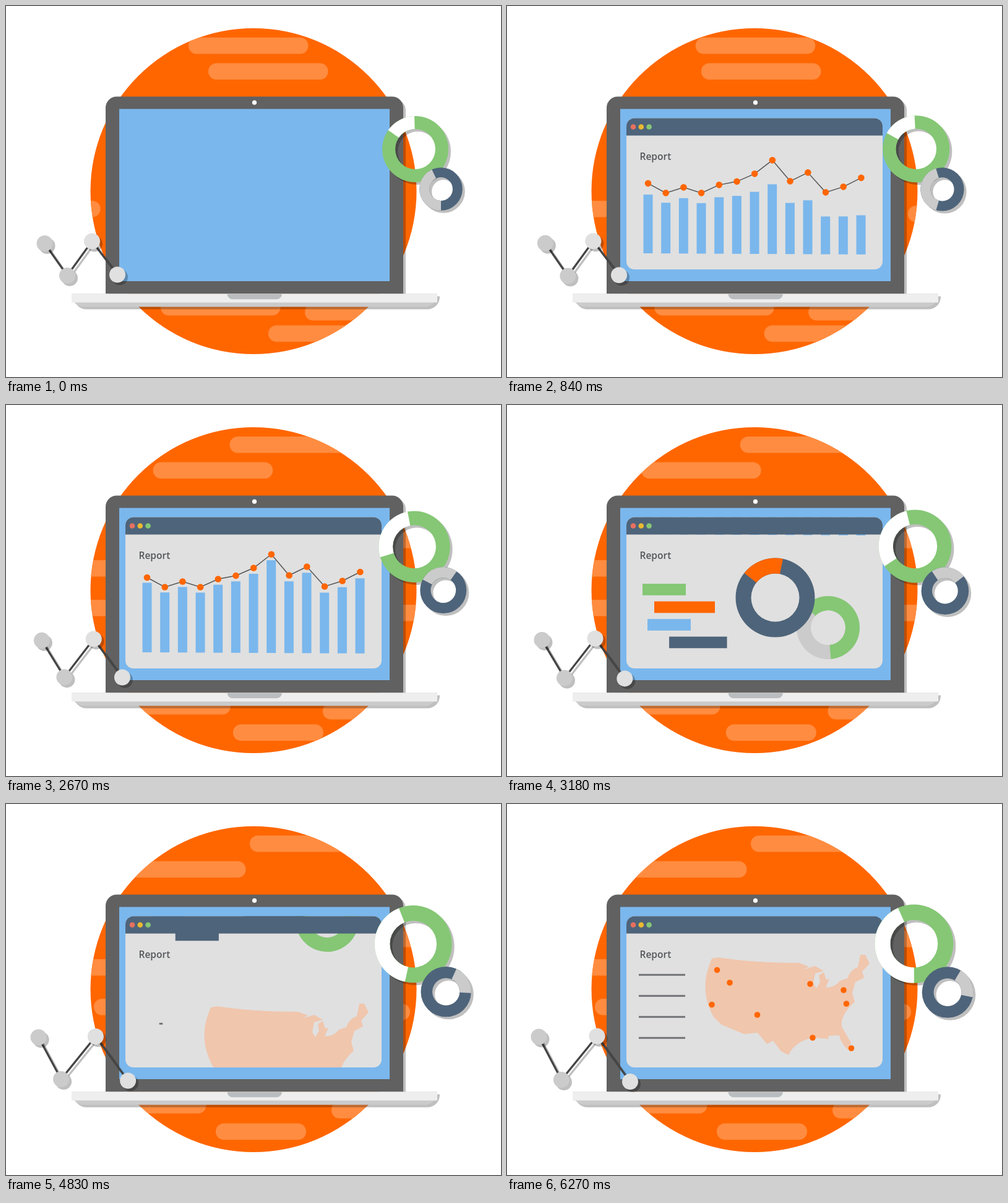
Animation, 800 px wide and 600 px high, one loop 6.3 s. Source, as an HTML page with a canvas:

```html
<!DOCTYPE html>
<html lang="en">
<head>
<meta charset="utf-8">
<title>Report</title>
<style>
html, body { margin: 0; width: 100%; height: 100%; overflow: hidden; background: #fff; }
canvas { display: block; }
</style>
</head>
<body>
<canvas id="stage" width="800" height="600"></canvas>
<script>
const c = document.getElementById('stage').getContext('2d');
const LOOP = 6300, STEP = 30, TAU = 2 * Math.PI;
const ORANGE = '#ff6600', BLUE = '#7ab7ed', NAVY = '#4e647a', GREEN = '#85c775',
      PALE = '#e0e0e0', GREY = '#cbcbcb';

// Background stripes: start x, y, travel, width
const stripes = [
  [295, 51, 99], [327, 92.5, -133], [250, 474, -120], [483, 482, 43], [424, 516.5, -85, 146],
  [-41, 315, 183], [181, 251, -134], [432, 205, 130], [668.5, 323, -209]
];
const heights = [112.5, 97, 106, 97, 110, 115.5, 128, 150, 116, 130, 98, 107, 121.5];
// Horizontal bars: centre, width, colour
const rows = [[254, 70, GREEN], [287, 98, ORANGE], [262, 70, BLUE], [308.8, 93.5, NAVY]];
const cities = [[339.5, 268.5], [360, 289], [331, 324.5], [404.5, 341], [490, 291],
  [544, 301], [548.5, 323], [494, 378], [556.5, 395]];
// Zigzag nodes: start x, y, travel x, y
const nodes = [[62.5, 384, -11, -7.5], [99, 436, -11, 10],
  [139, 380.5, 6.5, -5], [180, 434.5, 19, 14.5]];
const land = new Path2D(`M331 250L341 248Q400 257 472 257L488 263 478 268 498 262 512 270
  498 274 495 290 500 298 506 288 504 277 512 272 516 284 521 283 515 297Q530 297 538 286
  L550 282Q555 268 567 264L571 244 579 244 586 258 574 271 577 281 563 288 558 306 562 320
  Q538 342 541 360L556 386 551 398Q538 384 537 374L519 375 520 380 494 378Q465 384 455 406
  L443 400 430 383 420 388 405 370 383 372 347 357 334 345Q311 303 327 260Z`);

const ease = (t, start, length) => {
  const u = Math.min(1, Math.max(0, (t - start) / length));
  return u * u * (3 - 2 * u);
};
const mix = (a, b, p) => a + (b - a) * p;

function fill(color) { c.fillStyle = color; c.fill(); }
function rect(x, y, w, h, color) { c.fillStyle = color; c.fillRect(x, y, w, h); }
function round(x, y, w, h, r, color) {
  c.beginPath();
  c.roundRect(x, y, w, h, r);
  fill(color);
}
function dot(x, y, r, color) {
  c.beginPath();
  c.arc(x, y, r, 0, TAU);
  fill(color);
}
function polyline(points, width, color) {
  c.beginPath();
  points.forEach(([x, y]) => c.lineTo(x, y));
  c.lineWidth = width;
  c.strokeStyle = color;
  c.stroke();
}
function shadow(on) {
  c.shadowColor = on ? 'rgba(0,0,0,.25)' : 'transparent';
  c.shadowOffsetX = c.shadowOffsetY = on ? 4 : 0;
}
// Ring with one coloured section between two angles in degrees
function ring(x, y, R, r, base, color, from, to, raised) {
  c.beginPath();
  c.arc(x, y, R, 0, TAU);
  c.moveTo(x + r, y);
  c.arc(x, y, r, TAU, 0, true);
  shadow(raised);
  fill(base);
  shadow(false);
  const a = from * TAU / 360, b = to * TAU / 360;
  c.beginPath();
  c.arc(x, y, R, a, b);
  c.arc(x, y, r, b, a, true);
  fill(color);
}

function backdrop(t) {
  c.save();
  dot(400, 299.5, 263.5, ORANGE);
  c.clip();
  const p = ease(t, 0, 4330);
  for (const [x, y, travel, w = 193.5] of stripes)
    round(x + travel * p, y, w, 26.5, 13, '#ff8c40');
  c.restore();
}

function barPage(t) {
  const drop = 20.4 * (ease(t, 430, 970) - ease(t, 1640, 900));
  const points = [];
  heights.forEach((full, i) => {
    const grow = ease(t, 75 + 30 * i, 700);
    const h = full * grow * mix(0.845, 1, ease(t, 1600 + 15 * i, 750));
    rect(220.5 + 28.67 * i, 400 + 0.15 * i - h, 15, h, BLUE);
    if (grow > 0) points.push([228 + 28.7 * i, 391.5 - full + drop, Math.min(1, grow * 3)]);
  });
  polyline(points, 1.5, '#555');
  for (const [x, y, size] of points) dot(x, y, 5.3 * size, ORANGE);
}

function donutPage(t) {
  const size = ease(t, 2700, 460) * mix(1, 0.75, ease(t, 3500, 900));
  rows.forEach(([x, w, color], i) =>
    rect(x - w * size / 2, 279 + 28.5 * i, w * size, 18.7, color));
  const p = (t - 3180) / 1420;
  ring(519, 350, 51, 28, GREY, GREEN, -137, 85 + 100 * p);
  ring(433.5, 301.5, 64, 39, NAVY, ORANGE, -141.5, -78.8 + 60 * p);
}

function mapPage(t) {
  for (let i = 0; i < 4; i++) {
    const w = 75 * ease(t, 4730 + 120 * i, 600);
    rect(250.5 - w / 2, 274.8 + 34 * i, w, 3, '#727477');
  }
  c.fillStyle = '#f0c6ad';
  c.fill(land);
  cities.forEach(([x, y], i) => dot(x, y, 4.8 * ease(t, 5600 + i * 5 % 9 * 30, 400), ORANGE));
}

function browser(t) {
  c.save();
  c.beginPath();
  c.rect(183, 166.5, 437, 278.5);
  c.clip();
  c.translate(0, 264 * (1 - ease(t, 0, 450)));
  round(193, 181.5, 414, 244.5, 13, PALE);

  c.save();
  c.clip();
  const first = ease(t, 2670, 590), second = ease(t, 4466, 590);
  c.translate(0, -201 * first);
  if (first < 1) barPage(t);
  c.translate(0, 201 - 241 * second);
  if (first > 0 && second < 1) donutPage(t);
  c.translate(0, 241);
  if (second > 0) mapPage(t);
  c.restore();

  round(193, 181.5, 414, 28, [13, 13, 0, 0], NAVY);
  ['#e8705f', '#ebba30', GREEN].forEach((color, i) => dot(204 + 12.8 * i, 195.5, 4.3, color));
  c.font = '600 15.5px "Open Sans", "Noto Sans", sans-serif';
  c.fillStyle = '#54565a';
  c.fillText('Report', 214.5, 249.2);
  c.restore();
}

function laptop(t) {
  shadow(true);
  round(161, 146.5, 481, 319, [18, 18, 0, 0], '#616161');
  round(106, 465.5, 591, 21, [0, 0, 20, 20], GREY);
  shadow(false);
  rect(183, 166.5, 437, 278.5, BLUE);
  dot(401.5, 156.2, 3.6, '#fff');
  browser(t);
  rect(106, 465.5, 591, 14, '#eeeeee');
  round(357.5, 465.5, 88.5, 8.7, [0, 0, 8.7, 8.7], '#b9bdbf');
}

function ornaments(t) {
  const p = ease(t, 0, 6000);
  const zigzag = nodes.map(([x, y, dx, dy]) => [x + dx * p, y + dy * p]);
  shadow(true);
  polyline(zigzag, 3.3, '#454545');
  zigzag.forEach(([x, y], i) => dot(x, y, 13, i < 2 ? GREY : PALE));
  shadow(false);

  const size = mix(1, 1.187, p);
  ring(mix(661.5, 657.8, p), mix(231.5, 226, p), 53.5 * size, 32.4 * size,
    GREEN, '#fff', mix(215, 90, p), mix(268.4, 246, p), true);
  const lead = 1 - (1 - p) ** 1.5, trail = 1 - (1 - p) ** 1.2;
  ring(mix(703, 712, p), mix(296, 304.5, p), 34.8 * size, 18.9 * size,
    NAVY, GREY, mix(90, 301, lead), mix(245, 371, trail), true);
}

function frame(time) {
  const t = Math.floor(time % LOOP / STEP) * STEP;
  rect(0, 0, 800, 600, '#fff');
  backdrop(t);
  laptop(t);
  ornaments(t);
}

let begin;
requestAnimationFrame(function tick(now) {
  begin ??= now;
  frame(now - begin);
  requestAnimationFrame(tick);
});
</script>
</body>
</html>
```
